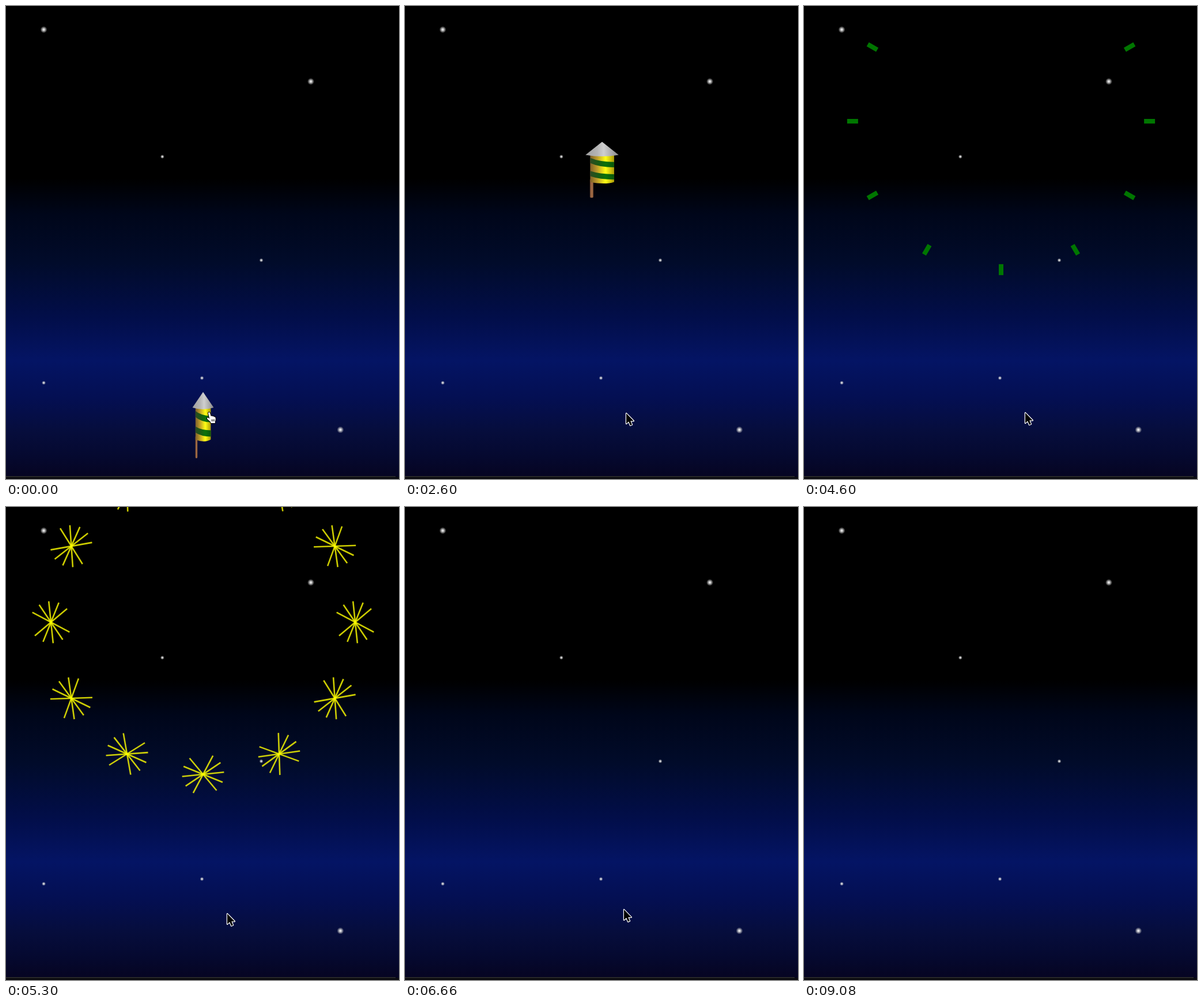
Recreate the animation shown at these times as an HTML page with a canvas. Size 682x821 px, loop 9100 ms.

```html
<!DOCTYPE html>
<html lang="en">
<head>
<meta charset="utf-8">
<title>Firework rocket</title>
<style>
html, body { margin: 0; width: 100%; height: 100%; overflow: hidden; background: #000; }
canvas { display: block; }
</style>
</head>
<body>
<canvas id="stage" width="682" height="821"></canvas>
<script>
const ctx = document.getElementById('stage').getContext('2d');
const W = 682, H = 821, LOOP = 9100, RAD = Math.PI / 180;

// Milestones in ms
const LAUNCH = 800, ARRIVE = 2800, EXPLODE = 3800, BURST = 4800;
const CENTER = { x: 342, y: 200 }, RING = 264;

const SKY = [
  [0, '#000'], [0.365, '#000'], [0.44, '#00061a'], [0.54, '#010b2a'],
  [0.66, '#020e4a'], [0.75, '#041464'], [0.83, '#040f52'],
  [0.9, '#060d3c'], [0.95, '#050930'], [1, '#060420']
];
const STARS = [
  [65.5, 41, 6], [529, 131, 6], [271.3, 261.5, 3.5], [443, 441.3, 3.5],
  [340, 645.7, 3.5], [65.5, 654, 3.5], [580.3, 735.6, 6]
];
const CURSOR = [
  [0, 352, 706], [1000, 352, 706], [1300, 350, 711], [1500, 350, 711],
  [2200, 384, 707], [2600, 384, 707], [4000, 384, 706], [6450, 384, 706],
  [6660, 380, 699], [7000, 372, 640], [7680, 342, 76], [7880, 334, -30]
];

const clamp = v => Math.max(0, Math.min(1, v));
const mix = (a, b, p) => a + (b - a) * p;
const span = (t, from, to) => clamp((t - from) / (to - from));

function bezier(x1, y1, x2, y2) {
  const at = (a, b, u) => 3 * a * u * (1 - u) ** 2 + 3 * b * u * u * (1 - u) + u ** 3;
  return x => {
    let lo = 0, hi = 1;
    for (let i = 0; i < 24; i++) {
      const mid = (lo + hi) / 2;
      if (at(x1, x2, mid) < x) lo = mid; else hi = mid;
    }
    return at(y1, y2, (lo + hi) / 2);
  };
}
const easeIn = bezier(0.42, 0, 1, 1);
const ease = bezier(0.25, 0.1, 0.25, 1);

function gradient(x1, y1, x2, y2, stops) {
  const g = ctx.createLinearGradient(x1, y1, x2, y2);
  stops.forEach(([at, color]) => g.addColorStop(at, color));
  return g;
}

function drawSky() {
  ctx.fillStyle = gradient(0, 0, 0, H, SKY);
  ctx.fillRect(0, 0, W, H);
  ctx.fillStyle = '#0b0b10';
  ctx.fillRect(0, 817, W, 4);
  ctx.fillStyle = '#30302e';
  ctx.fillRect(0, 816, 676, 1.5);
  for (const [x, y, r] of STARS) {
    const g = ctx.createRadialGradient(x, y, 0, x, y, r);
    g.addColorStop(0, '#fff');
    g.addColorStop(0.3, 'rgba(235,235,235,.85)');
    g.addColorStop(0.7, 'rgba(190,190,190,.45)');
    g.addColorStop(1, 'rgba(160,160,160,0)');
    ctx.fillStyle = g;
    ctx.fillRect(x - r, y - r, 2 * r, 2 * r);
  }
}

function drawStripe(left, right) {
  ctx.beginPath();
  ctx.moveTo(-14, left);
  ctx.quadraticCurveTo(-3, right, 14, right);
  ctx.lineTo(14, right + 11);
  ctx.quadraticCurveTo(-3, right + 11, -14, left + 10.5);
  ctx.fill();
}

function drawRocket(t) {
  if (t >= EXPLODE) return;
  const p = easeIn(span(t, LAUNCH, ARRIVE));
  ctx.save();
  ctx.globalAlpha = 1 - span(t, ARRIVE, EXPLODE);
  ctx.translate(342, mix(727.5, CENTER.y, p));
  ctx.scale(mix(1, 1.67, p), mix(1, 0.815, p));

  ctx.fillStyle = gradient(-13.5, 0, -9.5, 0, [[0, '#6e4630'], [0.5, '#a87048'], [1, '#7a5034']]);
  ctx.beginPath();
  ctx.roundRect(-13.5, 20, 3.8, 37.5, [0, 0, 2, 2]);
  ctx.fill();

  ctx.save();
  ctx.beginPath();
  ctx.moveTo(-13.2, -30);
  ctx.lineTo(13.4, -30);
  ctx.lineTo(13.4, 25);
  ctx.quadraticCurveTo(4, 31, -13.2, 25.5);
  ctx.clip();
  ctx.fillStyle = gradient(-13, 0, 13.5, 0,
    [[0, '#80602a'], [0.3, '#c0a028'], [0.64, '#ffff14'], [1, '#a89808']]);
  ctx.fillRect(-14, -32, 28, 64);
  ctx.fillStyle = gradient(-13, 0, 13.5, 0, [[0, '#2c4a22'], [0.35, '#185c14'], [0.64, '#0a720a'], [1, '#0b560b']]);
  drawStripe(-25, -16);
  drawStripe(2, 9);
  ctx.restore();

  ctx.fillStyle = gradient(-18, 0, 18, 0, [[0, '#a0a0a0'], [0.35, '#b4b4b4'], [0.55, '#cfcfcf'], [1, '#8c8c8c']]);
  ctx.beginPath();
  ctx.moveTo(0, -57.5);
  ctx.lineTo(18.4, -30.5);
  ctx.quadraticCurveTo(0, -24.5, -18.4, -30.5);
  ctx.fill();
  ctx.restore();
}

function aroundRing(radius, draw) {
  for (let a = 0; a < 360; a += 30) {
    ctx.save();
    ctx.translate(CENTER.x, CENTER.y);
    ctx.rotate(a * RAD);
    ctx.translate(radius, 0);
    draw();
    ctx.restore();
  }
}

function drawStreaks(t) {
  if (t < EXPLODE || t >= BURST) return;
  ctx.fillStyle = '#007600';
  aroundRing(RING * ease(span(t, EXPLODE, BURST)), () => ctx.fillRect(-9.5, -4, 19, 8));
}

function drawBursts(t) {
  const alpha = 1 - span(t, 5050, 6300);
  if (t < BURST || alpha <= 0) return;
  const reach = 45.5 * ease(span(t, BURST, 5800));
  ctx.globalAlpha = alpha;
  ctx.strokeStyle = '#ff0';
  ctx.lineWidth = 2.6;
  aroundRing(RING, () => {
    for (let k = 1; k <= 5; k++) {
      const c = Math.cos(28 * k * RAD) * reach, s = Math.sin(28 * k * RAD) * reach;
      ctx.beginPath();
      ctx.moveTo(-c, -s);
      ctx.lineTo(c, s);
      ctx.stroke();
    }
  });
  ctx.globalAlpha = 1;
}

const ARROW = new Path2D('M0 0V18L4.2 14.2L7 21L10 19.7L7.2 13.2H12.8Z');
const HAND = new Path2D('M-1 1C-1.3-1 1.3-1.6 2 .4L3.8 6.2C4.6 5.2 6.2 5.4 6.5 6.6' +
  'C7.5 5.8 8.8 6.2 9.1 7.3C10.3 6.8 11.3 7.5 11.5 8.6C12 11 11.8 13 10.8 15V18H3.6' +
  'L2.8 15.8L-2.6 11C-4 9.5-2.2 7.9-.8 8.8L1.3 10.4Z');
const KNUCKLES = new Path2D('M4.8 11.5L5.4 15M7 11.3L7.4 15M9.2 11.2L9.4 14.8');

function drawCursor(t) {
  const next = CURSOR.findIndex(key => key[0] > t);
  if (next < 0) return;
  const [t0, x0, y0] = CURSOR[next - 1], [t1, x1, y1] = CURSOR[next];
  const p = span(t, t0, t1);
  ctx.save();
  ctx.translate(mix(x0, x1, p), mix(y0, y1, p));
  ctx.lineJoin = 'round';
  if (t < 1440) {
    ctx.strokeStyle = '#000';
    ctx.lineWidth = 2;
    ctx.stroke(HAND);
    ctx.fillStyle = '#fff';
    ctx.fill(HAND);
    ctx.lineWidth = 0.9;
    ctx.stroke(KNUCKLES);
  } else {
    ctx.strokeStyle = '#fff';
    ctx.lineWidth = 2.4;
    ctx.stroke(ARROW);
    ctx.fillStyle = '#000';
    ctx.fill(ARROW);
  }
  ctx.restore();
}

function render() {
  const t = performance.now() % LOOP;
  drawSky();
  drawRocket(t);
  drawStreaks(t);
  drawBursts(t);
  drawCursor(t);
  requestAnimationFrame(render);
}
render();
</script>
</body>
</html>
```
